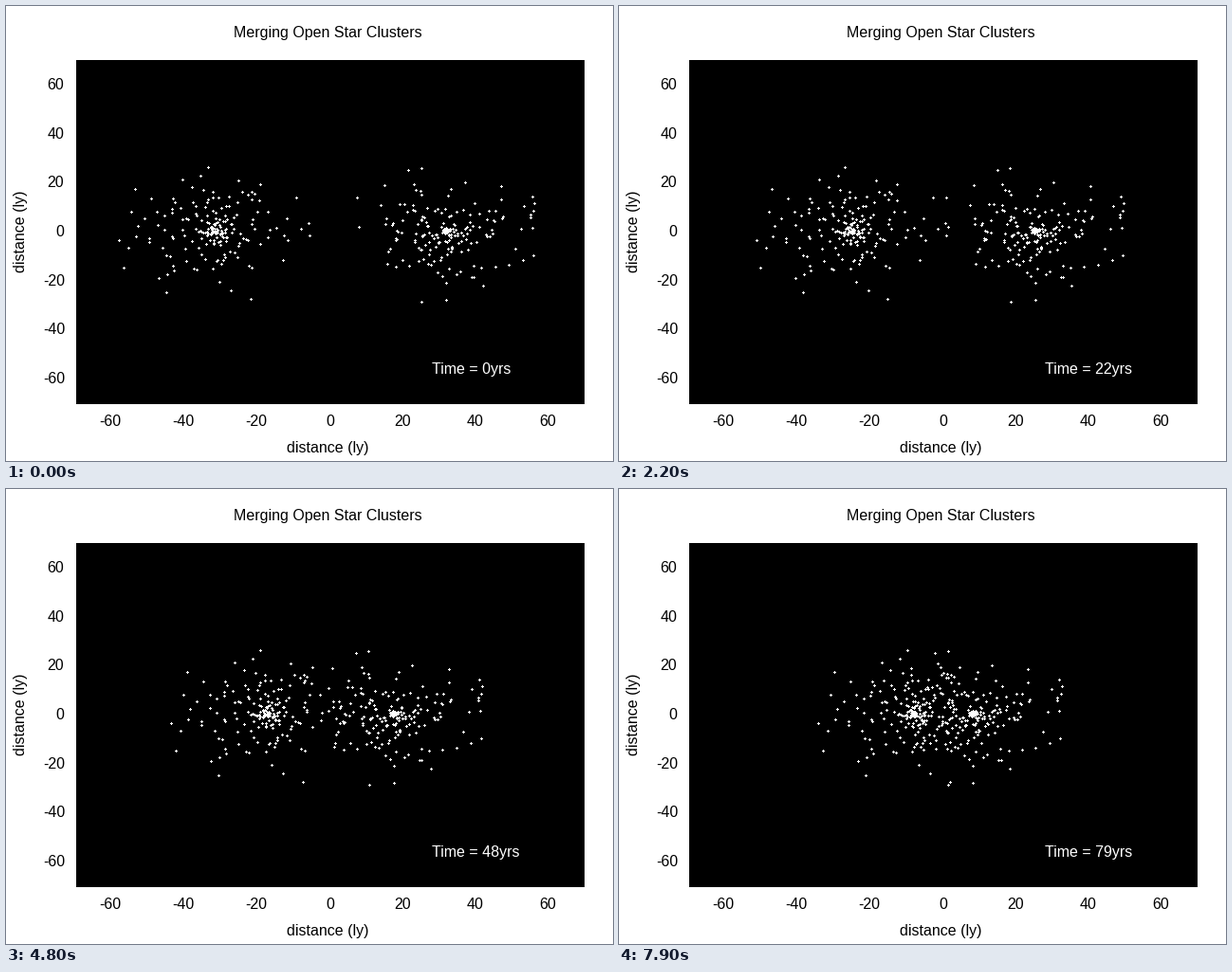
These frames come from a looping animation (640x480 px, 8 s). A matplotlib script:

```python
import numpy as np
import matplotlib.pyplot as plt
from matplotlib.animation import FuncAnimation
from matplotlib.collections import PolyCollection
from matplotlib.patches import Rectangle

FRAMES, INTERVAL = 80, 100
W, H, DPI = 640, 480, 100
CX, CY = 342, 238              # origin of the plot in pixels
SX, SY = 536 / 140, 362 / 140  # pixels per light year
START, SPEED = 32, 0.3         # cluster offset, light years per frame
RADIUS, STARS = 28, 190

plt.rcParams["font.family"] = "Liberation Sans"
plt.rcParams["font.size"] = 16 * 72 / DPI

# Outermost stars of each cluster, in pixels
LEFT_RIM = [(124, 276), (136, 193), (213, 170), (169, 302), (258, 309), (320, 242)]
RIGHT_RIM = [(370, 202), (424, 173), (522, 190), (556, 263), (464, 310), (438, 312)]
PLUS = np.array([(0, -1), (1, -1), (1, 0), (2, 0), (2, 1), (1, 1),
                 (1, 2), (0, 2), (0, 1), (-1, 1), (-1, 0), (0, 0)])


def cluster(rng, center, rim):
    """Sphere of stars, dense towards its middle, seen from the side."""
    r = RADIUS * rng.random(STARS) ** 1.15
    z = rng.uniform(-1, 1, STARS)
    a = rng.uniform(0, 2 * np.pi, STARS)
    rho = r * np.sqrt(1 - z * z)
    x = CX + SX * (center + rho * np.cos(a))
    y = CY - SY * rho * np.sin(a)
    return np.vstack([rim, np.column_stack([x, y])])


rng = np.random.default_rng(12)
left = cluster(rng, -START, LEFT_RIM)
right = cluster(rng, START, RIGHT_RIM)
stars = np.vstack([left, right])
heading = np.repeat([1, -1], [len(left), len(right)])

fig = plt.figure(figsize=(W / DPI, H / DPI), dpi=DPI, facecolor="white")
ax = fig.add_axes([0, 0, 1, 1])
ax.set_xlim(0, W)
ax.set_ylim(H, 0)
ax.axis("off")
ax.add_patch(Rectangle((74, 57), 536, 363, fc="black", lw=0, antialiased=False))

ax.text(240, 33, "Merging Open Star Clusters")
ax.text(339, 471, "distance (ly)", ha="center")
ax.text(20, 238, "distance (ly)", ha="center", va="baseline",
        rotation=90, rotation_mode="anchor")
for v in range(-60, 61, 20):
    minus = v < 0
    ax.text(CX + SX * v - 0.5 - 1.5 * minus, 443, str(v), ha="center")
    ax.text(61 + minus, round(CY - SY * v + 5), str(v), ha="right")

dots = PolyCollection([], facecolors="white", edgecolors="none",
                      linewidths=0, antialiaseds=False)
ax.add_collection(dots, autolim=False)
clock = ax.text(449, 388, "", color="white")


def update(n):
    x = stars[:, 0] + heading * SPEED * SX * n - 0.2
    pix = np.round(np.column_stack([x, stars[:, 1]]))
    dots.set_verts(pix[:, None, :] + PLUS)
    clock.set_text(f"Time = {n}yrs")
    return dots, clock


anim = FuncAnimation(fig, update, frames=FRAMES, interval=INTERVAL,
                     repeat=True, repeat_delay=0)
plt.show()
```
